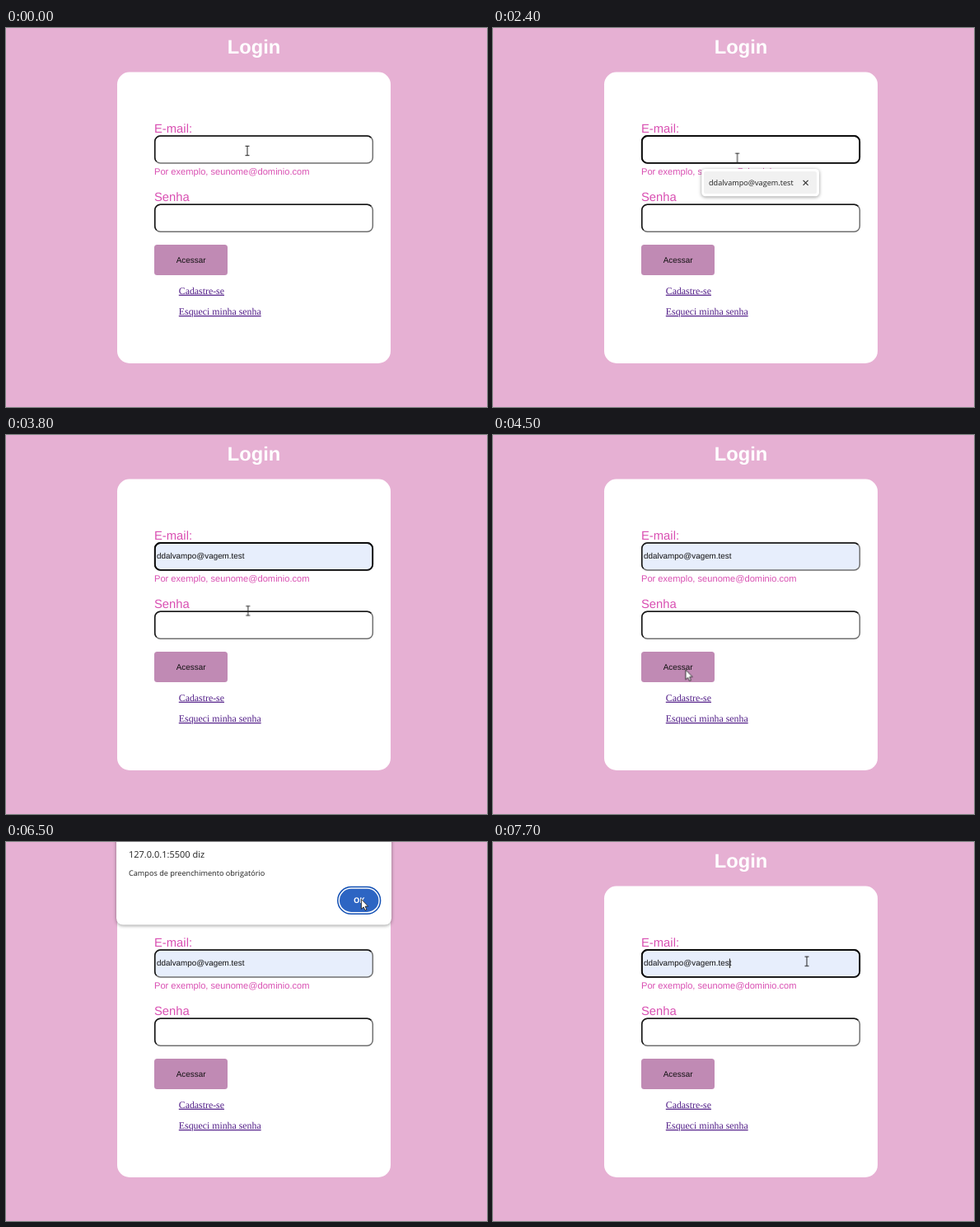
Write an HTML page that moves like this. It is 584 px wide and 460 px high and loops after 8000 ms.

```html
<!DOCTYPE html>
<html lang="pt-BR">
<head>
<meta charset="utf-8">
<title>Login</title>
<style>
  html, body { margin: 0; width: 100%; height: 100%; overflow: hidden; background: #e6b0d3; }
  svg { display: block; width: 584px; height: 460px; }
  text { font-family: "Liberation Sans", Arial, sans-serif; text-rendering: geometricPrecision; }
  .title { font-size: 23.7px; font-weight: 700; fill: #fff; text-anchor: middle; }
  .label { font-size: 14.8px; fill: #d94fb2; }
  .hint { font-size: 11.12px; fill: #d94fb2; }
  .value { font-size: 9.87px; fill: #111; }
  .link { font: 11.84px "Liberation Serif", Times, serif; fill: #4f1a86; text-decoration: underline; }
  .ui { font-family: "Open Sans", "Noto Sans", sans-serif; font-size: 9.15px; fill: #1f1f1f; }
  .heading { font-size: 11px; font-weight: 500; }
  .ok { font-size: 9.3px; font-weight: 700; fill: #fff; text-anchor: middle; }
  .caret { fill: #222; }
  .shadow { filter: drop-shadow(0 1px 2px rgba(0, 0, 0, .4)); }

  .anim { animation: 8s step-end -10ms infinite; }
  #filled { animation-name: filled; }
  #focus { animation-name: focus; }
  #caretStart { animation-name: caretStart; }
  #caretEnd { animation-name: caretEnd; }
  #suggestion { animation-name: suggestion; }
  #dialog { animation-name: dialog; }
  #okFill { animation-name: okHover; }
  #cursor { animation-name: move; }
  #beam { animation-name: beam; }
  #arrow { animation-name: arrow; }

  @keyframes filled { 0% { opacity: 0 } 32.5%, 100% { opacity: 1 } }
  @keyframes focus {
    0%, 56.25% { opacity: 0 }
    22.5%, 96.25%, 100% { opacity: 1 }
  }
  @keyframes caretStart {
    0%, 26.25%, 40%, 100% { opacity: 0 }
    22.5%, 32.5% { opacity: 1 }
  }
  @keyframes caretEnd {
    0%, 46.25%, 56.25% { opacity: 0 }
    40%, 52.5%, 96.25%, 100% { opacity: 1 }
  }
  @keyframes suggestion {
    0%, 41.25%, 100% { opacity: 0 }
    23.75% { opacity: 1 }
    40% { opacity: .3 }
  }
  @keyframes dialog {
    0%, 86.25%, 100% { opacity: 0 }
    61.25% { opacity: .4 }
    62.5% { opacity: .85 }
    63.75% { opacity: 1 }
  }
  @keyframes okHover { 0% { fill: #114fb4 } 78.75%, 100% { fill: #2d65c3 } }
  @keyframes beam {
    0%, 47.5%, 95%, 100% { opacity: 1 }
    31.25%, 52.5% { opacity: 0 }
  }
  @keyframes arrow {
    0%, 47.5%, 95%, 100% { opacity: 0 }
    31.25%, 52.5% { opacity: 1 }
  }
  @keyframes move {
    0% { transform: translate(293px, 149px) }
    28.75% { transform: translate(293px, 149px); animation-timing-function: steps(5) }
    35% { transform: translate(311px, 193px) }
    45% { transform: translate(311px, 193px); animation-timing-function: steps(9) }
    56.25% { transform: translate(233.5px, 284.5px) }
    71.25% { transform: translate(255.3px, 246.8px); animation-timing-function: steps(8) }
    81.25% { transform: translate(431px, 69px) }
    87.5% { transform: translate(431px, 69px); animation-timing-function: steps(7) }
    96.25%, 100% { transform: translate(381px, 144.8px) }
  }
</style>
</head>
<body>
<svg viewBox="0 0 584 460">
  <defs>
    <g id="field" fill="none" stroke-width="1.5">
      <rect x=".7" y=".7" width="264.6" height="33" rx="6.8" stroke="#707070"/>
      <path d="M2.7 31.7Q.7 29.7 .7 26.9V7.5A6.8 6.8 0 0 1 7.5 .7H258.5Q261.3 .7 263.3 2.7" stroke="#151515"/>
    </g>
  </defs>

  <rect width="584" height="460" fill="#e6b0d3"/>
  <text class="title" x="301" y="31">Login</text>
  <rect x="135" y="53.5" width="332" height="353.5" rx="15" fill="#fff"/>

  <text class="label" x="180" y="126.5">E-mail:</text>
  <text class="hint" x="180" y="178">Por exemplo, seunome@dominio.com</text>
  <text class="label" x="180" y="210">Senha</text>

  <g id="filled" class="anim">
    <rect x="180.7" y="131" width="264.6" height="33" rx="6.8" fill="#e7eefc"/>
    <text class="value" x="183" y="150.3">ddalvampo@vagem.test</text>
  </g>
  <use href="#field" x="180" y="130.3"/>
  <use href="#field" x="180" y="213.6"/>
  <rect id="focus" class="anim" x="180.8" y="131" width="264.4" height="32.8" rx="6.8" fill="none" stroke="#0c0c0c" stroke-width="1.8"/>
  <rect id="caretStart" class="anim caret" x="182.6" y="141.5" width="1" height="11.5"/>
  <rect id="caretEnd" class="anim caret" x="286.9" y="141.5" width="1" height="11.5"/>

  <rect x="180" y="263" width="89" height="37" rx="3.5" fill="#c08ab4"/>
  <text class="value" x="206.8" y="284.6">Acessar</text>
  <text class="link" x="209.8" y="322.7">Cadastre-se</text>
  <text class="link" x="209.8" y="348">Esqueci minha senha</text>

  <g id="suggestion" class="anim">
    <rect class="shadow" x="253.3" y="171" width="142.7" height="33.2" rx="4.5" fill="#fff"/>
    <rect x="256" y="174" width="137" height="27.3" rx="2.5" fill="#f1f1f1"/>
    <text class="ui" x="262" y="191.2">ddalvampo@vagem.test</text>
    <path d="M376.6 184.9l6 6m0-6l-6 6" stroke="#333" stroke-width="1.2"/>
  </g>

  <g id="dialog" class="anim">
    <rect class="shadow" x="134" y="-20" width="334" height="120.5" rx="8" fill="#fff"/>
    <text class="ui heading" x="149" y="19.3">127.0.0.1:5500 diz</text>
    <text class="ui" x="149" y="41">Campos de preenchimento obrigatório</text>
    <rect x="402.8" y="54.6" width="51.8" height="32.6" rx="16.3" fill="#fff" stroke="#114fb4" stroke-width="1.5"/>
    <rect id="okFill" class="anim" x="405" y="56.8" width="47.4" height="28.2" rx="14.1"/>
    <text class="ui ok" x="428.7" y="74.4">OK</text>
  </g>

  <g id="cursor" class="anim">
    <path id="beam" class="anim" d="M-2.5 -5.7H2.5M0 -5.7V5.7M-2.5 5.7H2.5" fill="none" stroke="#222" stroke-width="1"/>
    <path id="arrow" class="anim" d="M.4 .5V12.4L3.1 9.9L5 14L6.9 13.2L5.1 9.1H8.7Z" fill="#fff" stroke="#222" stroke-width=".9"/>
  </g>
</svg>
</body>
</html>
```
